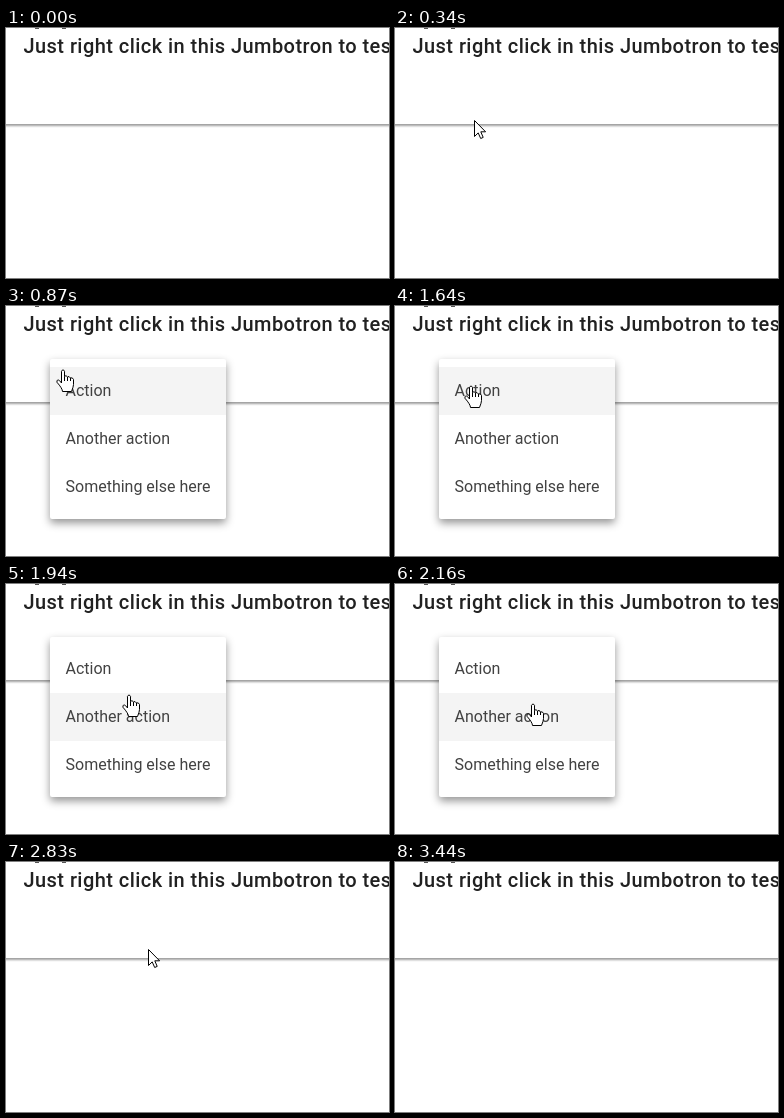
An HTML page that plays this animation: 383 px wide and 250 px high, repeating every 4.05 s.

```html
<!DOCTYPE html>
<html lang="en">
<head>
<meta charset="utf-8">
<title>Context menu</title>
<style>
  html, body { margin: 0; width: 100%; height: 100%; overflow: hidden; background: #fff; }
  body { position: relative; font-family: Roboto, sans-serif; color: #212121; }
  body > * { position: absolute; white-space: nowrap; }
  .card { left: -20px; top: -40px; width: 500px; height: 136px; background: #fff; box-shadow: 0 2px 2px rgba(0, 0, 0, .38); }
  .lead { left: 17.5px; top: 6px; font: 500 20px/24px Roboto, sans-serif; letter-spacing: .44px; }
  .tail { top: 0; width: 4px; height: 1px; background: #555; }
  #menu {
    left: 44px; top: 53px; width: 176px; padding: 8px 0; border-radius: 2px;
    background: #fff; box-shadow: 0 4px 8px rgba(0, 0, 0, .42);
  }
  #menu div { height: 48px; padding-left: 15.5px; font-size: 16px; line-height: 48px; color: #424242; }
  #menu .hover { background: #f4f4f4; }
  svg { left: 0; top: 0; overflow: visible; fill: #fff; stroke: #000; stroke-linejoin: round; }
</style>
</head>
<body>
<div class="card"></div>
<div class="tail" style="left: 29px"></div>
<div class="tail" style="left: 56px"></div>
<div class="lead">Just right click in this Jumbotron to test</div>
<div id="menu">
  <div>Action</div>
  <div>Another action</div>
  <div>Something else here</div>
</div>
<svg id="cursor" width="18" height="24">
  <path id="arrow" d="M.5 .5V16.5L4.2 12.9L6.7 18.5L9.2 17.4L6.8 11.8H11.6Z"/>
  <g id="hand" transform="translate(-6 0)">
    <path d="M5.5 14V2.3q1.5-3 3 0V7.5q1.5-2 3 .5q1.5-1.5 3 1q2-1 3 1.5v5q0 2-2 7h-9q0-3-5.6-9.3q0-3.5 2.6-1.6Z"/>
    <path fill="none" d="M8.5 7.5V12M11.5 8V12M14.5 9V12"/>
  </g>
</svg>
<script>
const LOOP = 4050, STEP = 75, MENU_OPEN = 870, MENU_CLOSE = 2830;
const easeOut = u => 1 - (1 - u) ** 2;
const easeIn = u => (u + u * u) / 2;

// The pointer rests between glides; the last one ends below the stage.
const glides = [
  { start: 60, end: 640, from: [149, 178], to: [56, 63], ease: easeOut },
  { start: 1640, end: 2240, from: [75, 79], to: [138, 120], ease: easeOut },
  { start: 2380, end: 2600, from: [139, 112], to: [142, 87], ease: easeOut },
  { start: 3140, end: 3440, from: [152, 99], to: [320, 302], ease: easeIn }
];

const [menu, cursor, arrow, hand] =
  ['menu', 'cursor', 'arrow', 'hand'].map(id => document.getElementById(id));
const show = (el, on) => { el.style.display = on ? '' : 'none'; };

// Glides advance in even steps of about STEP ms, as a screen recorder sees them.
function pointerAt(t) {
  const glide = glides.findLast(g => g.start <= t);
  if (!glide) return null;
  const { start, end, from, to, ease } = glide;
  const steps = Math.round((end - start) / STEP);
  const u = Math.min(1, Math.floor((t - start) / (end - start) * steps + .15) / steps);
  return from.map((a, i) => Math.round(a + (to[i] - a) * ease(u)));
}

function draw(now) {
  const t = now % LOOP;
  const open = t >= MENU_OPEN && t < MENU_CLOSE;
  const pos = pointerAt(t);
  show(menu, open);
  show(cursor, pos);
  show(arrow, !open);
  show(hand, open);
  if (pos) {
    const [x, y] = pos;
    cursor.style.transform = `translate(${x}px, ${y}px)`;
    const hovered = Math.floor((y - 61) / 48);
    [...menu.children].forEach((item, i) => item.classList.toggle('hover', i === hovered));
  }
  requestAnimationFrame(draw);
}
draw(0);
</script>
</body>
</html>
```
